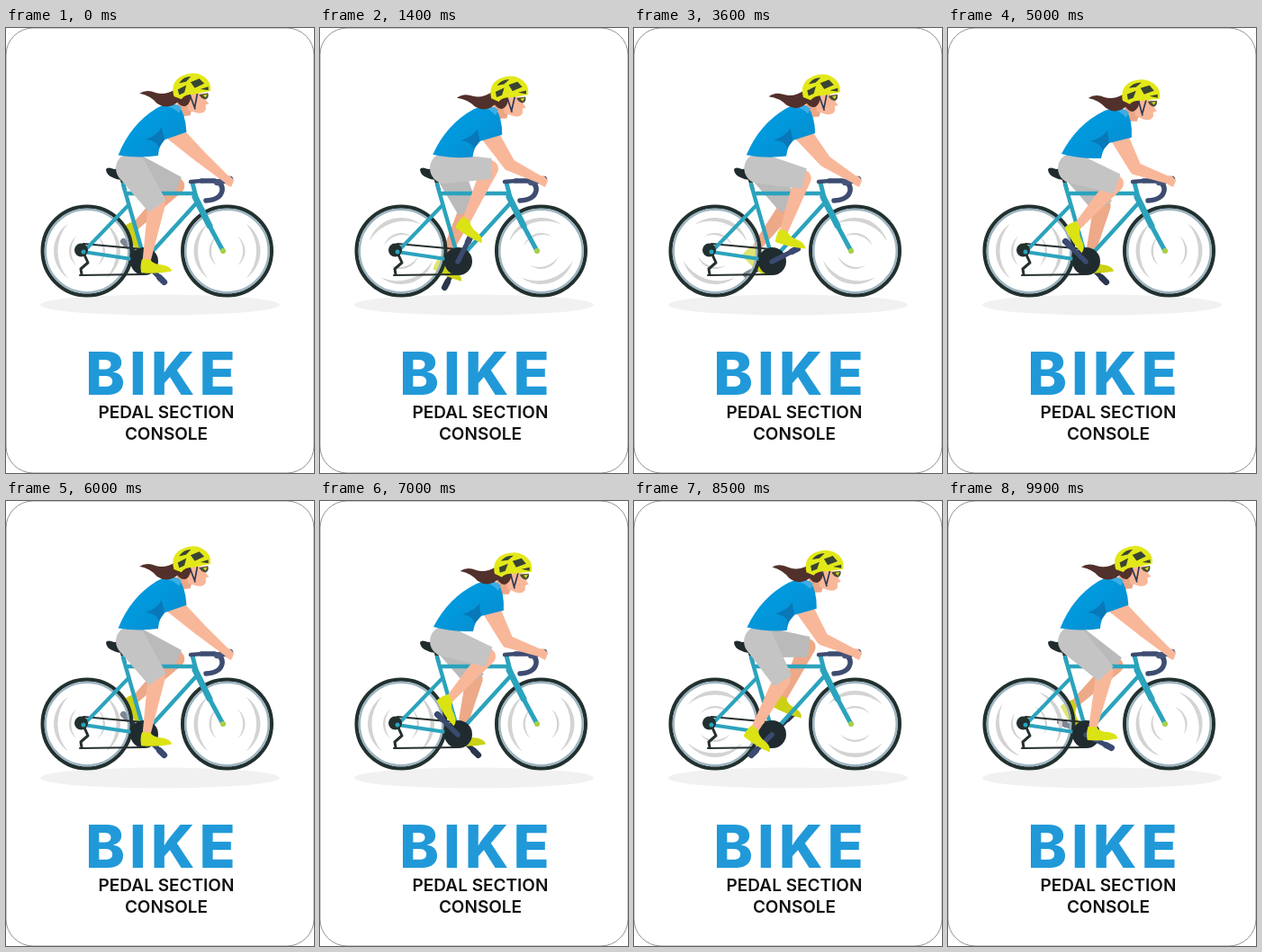
Animation of 342x495 px, one loop 10000 ms. Source, as an HTML page:

```html
<!DOCTYPE html>
<html lang="en">
<head>
<meta charset="utf-8">
<title>Bike card</title>
<style>
  html, body { margin: 0; width: 100%; height: 100%; overflow: hidden; background: #fff; }
  svg { display: block; width: 342px; height: 495px; }
  text { font-family: Inter, "Open Sans", sans-serif; text-anchor: middle; }
  .line { fill: none; stroke-linecap: round; stroke-linejoin: round; }
</style>
</head>
<body>
<svg viewBox="0 0 342 495">
  <defs>
    <linearGradient id="shirt" x1="0" y1="0" x2="1" y2="1">
      <stop offset=".4" stop-color="#0099dd"/><stop offset="1" stop-color="#0a8bcd"/>
    </linearGradient>
    <g id="blur" fill="#d4d3d3">
      <path id="crescents" d="M21.2-30.3A37 37 0 0 1 21.2 30.3A46 46 0 0 0 21.2-30.3ZM11.5-16.4A20 20 0 0 1 11.5 16.4A25 25 0 0 0 11.5-16.4Z"/>
      <use href="#crescents" transform="rotate(180)"/>
    </g>
    <g id="wheel" fill="none">
      <circle r="49.4" stroke="#22312f" stroke-width="4.2"/>
      <circle r="46.2" stroke="#9db4c0" stroke-width="2.4"/>
    </g>
    <path id="shoe" d="M-20-7Q-21-15-18-22L-9-21Q-6-15 4-14Q13-12 14-6Q-2-4-20-7Z"/>
  </defs>

  <rect width="342" height="495" rx="30" fill="#fff" stroke="#929292"/>
  <ellipse cx="171" cy="308" rx="133" ry="11.5" fill="#f1f1f1"/>

  <g id="far"></g>

  <g transform="translate(90 248)">
    <circle r="46" fill="#fff" opacity=".4"/>
    <use href="#blur" class="spin"/><use href="#wheel"/>
  </g>
  <g transform="translate(245.500 248)"><use href="#blur" class="spin"/><use href="#wheel"/></g>

  <g class="line">
    <path d="M86 240L152 246M82 275L152 274" stroke="#26302f" stroke-width="2"/>
    <path d="M86 250L91 261L83 268L84 274" stroke="#26302f" stroke-width="3"/>
    <path d="M128 166L132 180" stroke="#26302f" stroke-width="4"/>
    <path d="M86 249L136 197M86 249L153 259" stroke="#2ba3bd" stroke-width="4"/>
    <path d="M130 174L154 258L213 193M134 184H209" stroke="#2ba3bd" stroke-width="4.500"/>
    <path d="M207 172L213 196L241 248" stroke="#2ba3bd" stroke-width="5"/>
    <path d="M210 188L226 220" stroke="#2ba3bd" stroke-width="7"/>
    <path d="M205 171L218 170" stroke="#3d4c70" stroke-width="4.500"/>
    <path d="M217 170H231Q241 172 240 181Q238 191 222 192" stroke="#3d4c70" stroke-width="5.500"/>
    <path d="M234 172L249 168" stroke="#46557a" stroke-width="6.500"/>
  </g>
  <circle cx="83.500" cy="247" r="7.500" fill="#22302f"/>
  <circle cx="86" cy="249" r="2.500" fill="#2ba3bd"/>
  <circle cx="241" cy="248" r="3" fill="#a8cf46"/>
  <path d="M111 157Q113 154 120 157L136 155V166Q127 171 120 167Q111 164 111 157Z" fill="#202b2d"/>
  <circle cx="153.500" cy="259.500" r="15.500" fill="#202b30"/>

  <g id="near"></g>

  <path id="arm" fill="#f9b799"/>
  <g id="torso">
    <path d="M197 86L214 92L210 104L194 104Z" fill="#eba686"/>
    <path d="M126 140Q143 107 174 92Q189 86 198 92Q205 102 204 122L179 128Q173 131 170 145Q147 146 126 140Z" fill="url(#shirt)"/>
    <path d="M177 114Q172 122 158 126Q170 128 172 136L179 128Z" fill="#0878b9"/>
    <path d="M181 91Q189 90 198 100L201 94Q191 86 181 91Z" fill="#3caee5"/>
    <path id="tail" d="M200 86Q187 97 175 88Q168 79 156 76Q164 71 174 76Q184 80 197 73Z" fill="#52302b"/>
    <g transform="translate(2 -1)">
      <path d="M205 80L226 82L226 88L230 94L226 95L226 100Q223 105 216 103L206 99Z" fill="#f9b799"/>
      <path d="M193 78L211 80Q211 91 204 94Q197 95 193 84Z" fill="#52302b"/>
      <path d="M210 83L214 98M218 82L214 96" class="line" stroke="#2c3a56" stroke-width="1.700"/>
      <path d="M220 83L230 82Q231 87 227 89Q222 88 220 83Z" fill="#4a4c35"/>
      <path d="M224 84L229 83L227 87Z" fill="#cfd622"/>
      <path d="M192 82Q189 65 204 60Q219 55 229 65Q235 71 233 80L214 82Q204 81 200 86Z" fill="#e3e819"/>
      <path d="M199 68Q205 61 213 62L207 67ZM197 75L207 71L204 79L198 81ZM212 68L222 65L227 71L216 75ZM222 77L231 75V79Z" fill="#394532"/>
    </g>
  </g>
  <path d="M242 165Q249 162 253 170L250 177L244 174Z" fill="#f9b799"/>

  <text x="174" y="408" font-size="66" font-weight="800" letter-spacing="5" fill="#2199d8">BIKE</text>
  <g font-size="19" font-weight="600" fill="#111">
    <text x="178" y="434">PEDAL SECTION</text>
    <text x="178" y="458">CONSOLE</text>
  </g>
</svg>
<script>
const $ = id => document.getElementById(id);
const rad = deg => deg * Math.PI / 180;
const mix = (a, b, t) => [a[0] + (b[0] - a[0]) * t, a[1] + (b[1] - a[1]) * t];
const axle = [153, 260], hand = [247, 170];

function turn([x, y], deg, [ox, oy] = [0, 0]) {
  const c = Math.cos(rad(deg)), s = Math.sin(rad(deg));
  return [ox + x * c - y * s, oy + x * s + y * c];
}

// Middle joint of a two-part limb; side picks the bend direction.
function joint(a, b, la, lb, side) {
  const dx = b[0] - a[0], dy = b[1] - a[1];
  const d = Math.min(Math.hypot(dx, dy), la + lb - 0.01);
  const bend = Math.acos((la * la + d * d - lb * lb) / (2 * la * d));
  const angle = Math.atan2(dy, dx) + side * bend;
  return [a[0] + la * Math.cos(angle), a[1] + la * Math.sin(angle)];
}

// Tapered limb, round at the start and, optionally, at the end.
function limb(a, b, ra, rb, roundEnd = true) {
  const d = Math.hypot(b[0] - a[0], b[1] - a[1]);
  const nx = (a[1] - b[1]) / d, ny = (b[0] - a[0]) / d;
  const at = (p, r) => `${(p[0] + nx * r).toFixed(2)} ${(p[1] + ny * r).toFixed(2)}`;
  const end = roundEnd ? `A${rb} ${rb} 0 0 0 ` : 'L';
  return `M${at(a, ra)}L${at(b, rb)}${end}${at(b, -rb)}L${at(a, -ra)}A${ra} ${ra} 0 0 0 ${at(a, ra)}Z`;
}

function leg(hip, theta, { skin, cloth, shoe, metal }) {
  const onCrank = r => turn([r, 0], theta, axle);
  const pedal = onCrank(25);
  const tilt = 25 - 30 * Math.cos(rad(theta - 35));
  const ankle = turn([-13, -20], tilt, pedal);
  const knee = joint(hip, ankle, 49.5, 63, -1);
  return `<g class="line" stroke="${metal}">
      <path d="M${axle}L${pedal}" stroke-width="5.500"/>
      <path d="M${pedal}L${onCrank(32)}" stroke-width="7"/>
    </g>
    <path d="${limb(knee, ankle, 9.5, 4.5)}" fill="${skin}"/>
    <use href="#shoe" transform="translate(${pedal}) rotate(${tilt})" fill="${shoe}"/>
    <path d="${limb(hip, mix(hip, knee, 1.04), 17, 11.5, false)}" fill="${cloth}"/>`;
}

const farLook = { skin: '#eda988', cloth: '#bababa', shoe: '#cbd114', metal: '#2a364c' };
const nearLook = { skin: '#f9b799', cloth: '#c4c4c4', shoe: '#dbe314', metal: '#3a4a70' };

function draw(now) {
  const step = Math.floor(now / 100) % 100;
  const theta = 45 + 18 * step;
  const lean = -2.9 * (1 + Math.cos(rad(18 * (step + 1))));

  document.querySelectorAll('.spin').forEach(e => e.setAttribute('transform', `rotate(${18 * step})`));
  $('far').innerHTML = leg([143, 157], theta + 180, farLook);
  $('near').innerHTML = leg([139, 156], theta, nearLook);

  $('torso').setAttribute('transform', `rotate(${lean} 140 155)`);
  $('tail').setAttribute('transform', `rotate(${4 * Math.sin(rad(theta))} 195 80)`);
  const shoulder = turn([50, -34], lean, [140, 155]);
  const elbow = joint(shoulder, hand, 40, 41, 1);
  $('arm').setAttribute('d', limb(shoulder, elbow, 10, 7) + limb(elbow, hand, 7, 4));
}

function loop() {
  draw(performance.now());
  requestAnimationFrame(loop);
}
loop();
</script>
</body>
</html>
```
